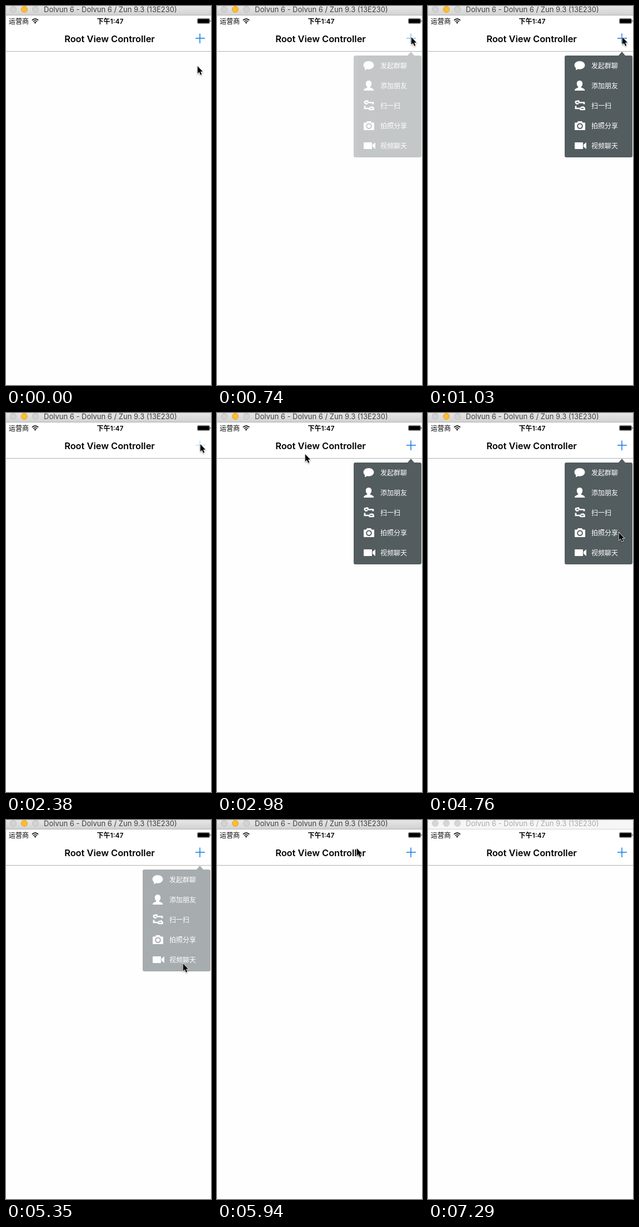
Animation of 369x681 px, one loop 7370 ms. Source, as an HTML page:

```html
<!DOCTYPE html>
<html lang="zh-CN">
<head>
<meta charset="utf-8">
<title>Popover menu</title>
<style>
  html, body { margin: 0; width: 100%; height: 100%; overflow: hidden; background: #fefefe; }
  svg { display: block; width: 369px; height: 681px; }
  text { font-family: Inter, "Noto Sans CJK SC", "Noto Sans CJK", sans-serif; font-size: 12px; }
  .bar { fill: url(#chrome); }
  .edge { fill: #b1b1b1; }
  .caption { font-size: 13px; fill: #3e3e3e; }
  .light { fill: #d3d3d3; stroke: #bcbcbc; }
  .light.yellow { fill: #fdbd2e; stroke: #dfa32f; }
  .inactive .bar { fill: #f6f6f6; }
  .inactive .edge { fill: #d3d3d3; }
  .inactive .caption { fill: #a9a9a9; }
  .inactive .light { fill: #d6d6d6; stroke: #cdcdcd; }
  .heading { font-size: 16.4px; font-weight: 600; text-anchor: middle; }
  .time { font-weight: 600; text-anchor: middle; }
  #popup { fill: #fff; }
  .panel { fill: #535d60; }
</style>
</head>
<body>
<svg viewBox="0 0 369 681">
  <defs>
    <linearGradient id="chrome" x2="0" y2="1">
      <stop stop-color="#e6e6e6"/><stop offset="1" stop-color="#d2d2d2"/>
    </linearGradient>
    <filter id="shadow" x="-50%" y="-50%" width="200%" height="200%">
      <feDropShadow dx="0" dy="1.2" stdDeviation="1" flood-opacity=".4"/>
    </filter>
  </defs>

  <rect width="369" height="81" fill="#fff"/>
  <rect y="81" width="369" height="1" fill="#b2b2b2"/>

  <g id="chromeBar">
    <rect class="bar" width="369" height="16"/>
    <rect class="edge" y="16" width="369" height="1"/>
    <circle class="light" cx="13" cy="6" r="5.5"/>
    <circle class="light yellow" cx="33" cy="6" r="5.5"/>
    <circle class="light" cx="53" cy="6" r="5.5"/>
    <text class="caption" x="68" y="11">Dolvun 6 - Dolvun 6 / Zun 9.3 (13E230)</text>
  </g>

  <text x="5" y="32">运营商</text>
  <path d="M46.8 25.6q5.7-5 11.4 0M48.9 28q3.6-3 7.2 0" fill="none" stroke="#000" stroke-width="1.6"/>
  <path d="M50.4 29.6q2.1-1.6 4.2 0l-2.1 2.2z"/>
  <text class="time" x="187.5" y="32">下午1:47</text>
  <rect x="344.5" y="22.5" width="22" height="9" rx="1.5" fill="#fff" stroke="#888"/>
  <rect x="345.2" y="23.2" width="20.6" height="7.6" rx=".8"/>
  <path d="M367.4 25.3q1.8 1.7 0 3.600z"/>

  <text class="heading" x="186.5" y="65">Root View Controller</text>
  <path id="plus" d="M341 58h17M349 49.500v17.500" stroke="#1079e8" stroke-width="1.500"/>

  <g id="popup">
    <path class="panel" d="M343 89l6-7 6 7h10a3 3 0 0 1 3 3v177a3 3 0 0 1-3 3H249a3 3 0 0 1-3-3V92a3 3 0 0 1 3-3z"/>
    <path d="M273 99c5.3 0 9.4 3.2 9.4 7.3s-4.1 7.4-9.4 7.4q-1.6 0-3-.4-2 1.8-4.3 1.6.9-1.5.6-3.4c-1.7-1.3-2.7-3.1-2.7-5.2 0-4.1 4.1-7.3 9.4-7.3z"/>
    <path d="M273 134c3.3 0 5.2 2.3 5.2 5.4 0 2.6-1.2 4.6-2.5 5.7v1.4c3.5 1.2 6.7 2.2 6.7 5.5H264c0-3.3 3-4.3 6.3-5.5v-1.4c-1.3-1.1-2.5-3.1-2.5-5.7 0-3.1 1.9-5.4 5.2-5.4z"/>
    <path d="M266 175v-3.500l5-1 1 3h9v3M266 175.500h5M264.500 184h8.500l2 2h6M274.500 182.500l5-1 2 2v3.500M266 179.500v4" fill="none" stroke="#fff" stroke-width="2.700" stroke-linejoin="round"/>
    <path d="M265 209.500h3.500l1.500-2.500h7l1.500 2.500h3.500q1 0 1 1v11.500q0 1-1 1h-17q-1 0-1-1v-11.500q0-1 1-1z"/>
    <circle class="panel" cx="273.500" cy="215.800" r="5.300"/>
    <circle cx="273.500" cy="215.800" r="3.300"/>
    <path d="M265 245h13q1 0 1 1v10q0 1-1 1h-13q-1 0-1-1v-10q0-1 1-1zM280 249l5-4v12l-5-4z"/>
  </g>

  <g id="cursor" filter="url(#shadow)">
    <path d="M.8 1v13.200l3-2.700 2.300 5.200 2.200-.900-2.300-5.100h4.100z" stroke="#fff" stroke-width="1.400" paint-order="stroke"/>
  </g>
</svg>
<script>
  const LOOP = 7370, TICK = 148.5, BLUR_AT = 7290;
  const [plus, popup, cursor, chromeBar] =
    ["plus", "popup", "cursor", "chromeBar"].map(id => document.getElementById(id));

  ["发起群聊", "添加朋友", "扫一扫", "拍照分享", "视频聊天"].forEach((label, row) =>
    popup.insertAdjacentHTML("beforeend", `<text x="294" y="${111.5 + 36 * row}">${label}</text>`));

  // The screen refreshes once per tick; all times below are in ticks.
  const visits = [{ open: 4, close: 12 }, { open: 16, close: 22 }, { open: 27, close: 36 }];
  const home = [344, 107], button = [349, 55];
  const moves = [
    { from: 0, to: 2, end: [340, 65] },
    { from: 3, to: 4, end: button },
    { from: 18, to: 20, end: [158, 73] },
    { from: 25, to: 26, end: [261, 95] },
    { from: 26, to: 27, end: button },
    { from: 30, to: 32, end: [343, 214] },
    { from: 32, to: 35, end: [318, 257] },
    { from: 37, to: 40, end: [251, 50] },
    { from: 40, to: 42, end: [250, 37] },
    { from: 43, to: 44, end: [307, 252] }
  ];
  const CURSOR_GONE = 45;

  const ramp = (k, from, to) => Math.min(1, Math.max(0, (k - from) / (to - from)));
  const pointerAt = k => moves.reduce((pos, { from, to, end }) =>
    pos.map((p, i) => p + (end[i] - p) * ramp(k, from, to)), home);

  function draw() {
    const t = performance.now() % LOOP;
    const k = Math.floor((t + 12) / TICK);
    const visit = visits.findLast(v => k >= v.open);
    const shown = visit ? ramp(k, visit.open, visit.open + 3) : 0;
    const hidden = visit ? ramp(k, visit.close - 1, visit.close + 1) : 0;

    popup.setAttribute("opacity", shown * (1 - hidden));
    plus.setAttribute("opacity", visit ? .25 + .75 * shown : 1);
    cursor.setAttribute("transform", `translate(${pointerAt(k)})`);
    cursor.setAttribute("visibility", k < CURSOR_GONE ? "visible" : "hidden");
    chromeBar.classList.toggle("inactive", t >= BLUR_AT);
    requestAnimationFrame(draw);
  }
  draw();
</script>
</body>
</html>
```
